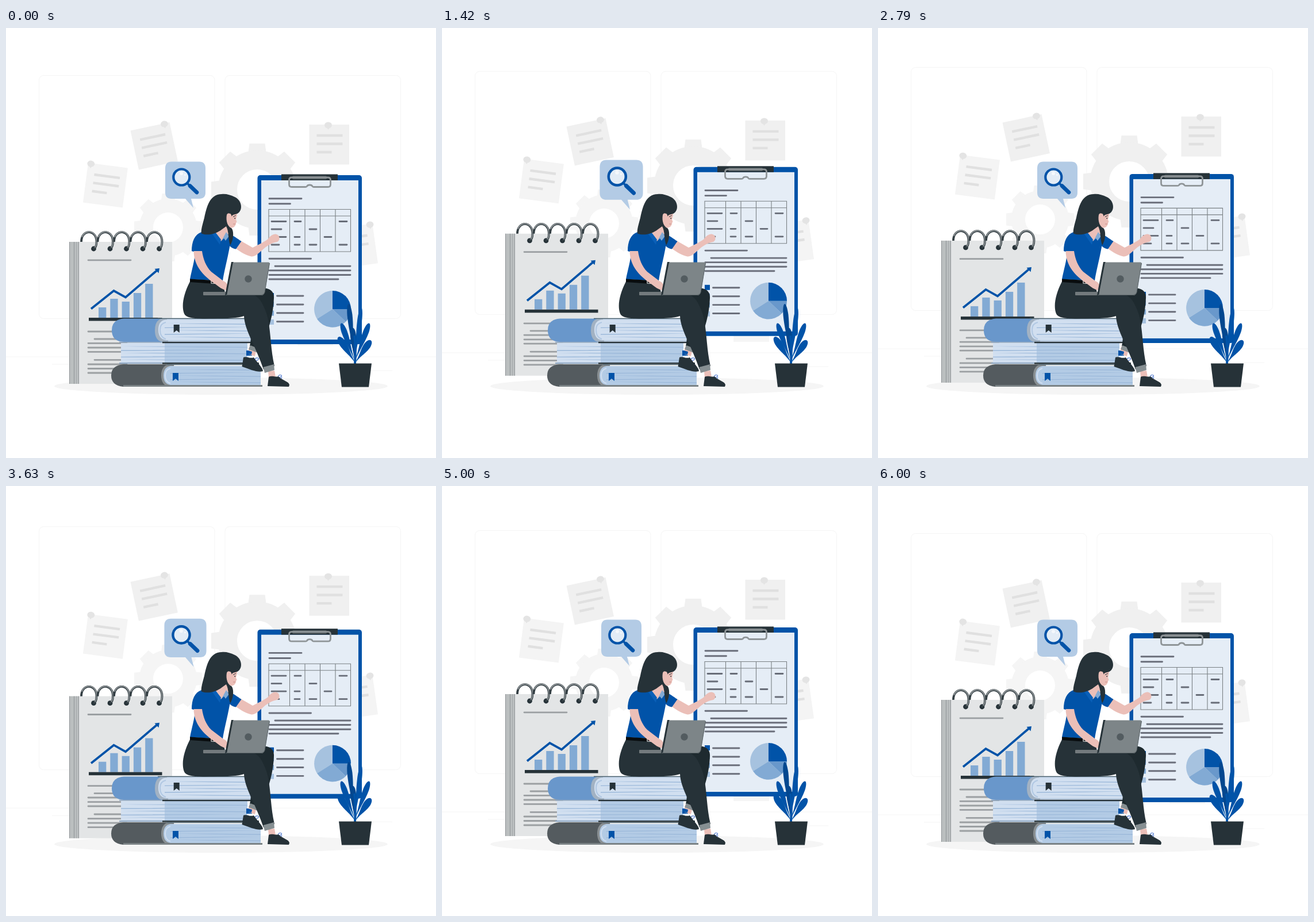
An HTML page that plays this animation: 748 px wide and 748 px high, repeating every 6.04 s.

```html
<!DOCTYPE html>
<html lang="en">
<head>
<meta charset="utf-8">
<title>Report analysis</title>
<style>
html, body { margin: 0; width: 100%; height: 100%; overflow: hidden; background: #fff; }
svg { display: block; width: 100%; height: 100%; }
</style>
</head>
<body>
<svg id="stage" viewBox="0 0 748 748"></svg>
<script>
const BLUE = '#0153a8', DARK = '#263238', SKIN = '#ebbfb8', PALE = '#b3cbe5', LIGHT = '#d1dff0';

const path = (d, fill, more = '') => `<path d="${d}" fill="${fill}" ${more}/>`;
const stroke = (d, color, width, more = '') =>
  `<path d="${d}" fill="none" stroke="${color}" stroke-width="${width}" ${more}/>`;
const rect = (x, y, w, h, fill, r = 0, more = '') =>
  `<rect x="${x}" y="${y}" width="${w}" height="${h}" rx="${r}" fill="${fill}" ${more}/>`;
const circle = (x, y, r, fill, more = '') => `<circle cx="${x}" cy="${y}" r="${r}" fill="${fill}" ${more}/>`;
const group = (id, body) => `<g id="${id}">${body}</g>`;
// rows of [y, from, to, from, to, ...] drawn as horizontal rules
const rules = (rows, color, width, cap = 'round') => stroke(rows.map(([y, ...xs]) =>
  xs.map((x, i) => (i % 2 ? 'H' + x : `M${x},${y}`)).join('')).join(''), color, width, `stroke-linecap="${cap}"`);

function gear(x, y, body, hole, tip, tooth, color) {
  let teeth = '';
  for (let a = 0; a < 360; a += 45)
    teeth += path(`M${-tooth * 0.58},${-body + 4}L${-tooth / 2},${-tip}H${tooth / 2}L${tooth * 0.58},${-body + 4}Z`,
      color, `transform="rotate(${a})"`);
  const ring = circle(0, 0, (body + hole) / 2, 'none', `stroke="${color}" stroke-width="${body - hole}"`);
  return `<g transform="translate(${x} ${y})">${teeth}${ring}</g>`;
}

function note(x, y, angle, pin, color) {
  return `<g transform="translate(${x} ${y}) rotate(${angle})">` + rect(0, 0, 69.5, 69.5, color) +
    rules([[19, 13, 58], [33.5, 13, 58], [48, 13, 39]], '#e0e0e0', 4.4, 'butt') +
    path(`M${pin - 3},4L${pin},9L${pin + 3},4Z`, '#e4e4e4') +
    `<ellipse cx="${pin}" cy="1" rx="6.5" ry="5.5" fill="#e4e4e4"/></g>`;
}

function background() {
  const frame = x => rect(x, 82.5, 305.5, 423, 'none', 8, 'stroke="#f5f5f5"');
  return frame(57.5) + frame(381) +
    stroke('M0,572H748M80,585H160M395,600H430M600,596H672', '#f5f5f5', 1) +
    rect(507, 520, 62, 33, '#f5f5f5') +
    gear(282, 347, 50, 26, 59, 21, '#f5f5f5') + gear(437, 281, 68, 35, 80, 27, '#f0f0f0') +
    note(216.5, 178.5, -12, 60, '#f0f0f0') + note(143, 234.5, 7.5, 5, '#f4f4f4') +
    note(527.5, 168, 0, 33, '#f0f0f0') + note(568.5, 350, -8, 65, '#f4f4f4');
}

function notepad() {
  let s = rect(110, 372, 179, 247, '#e3e5e6') + rect(110, 372, 17, 247, '#babebf') +
    stroke('M110.5,372V619M118.5,372V619M126.5,372V619', '#909597', 1) +
    stroke('M122.5,372V619', '#a5aaac', 1);
  for (let i = 0; i < 5; i++) {
    const x = 131 + i * 28.5;
    s += circle(x + 21.5, 384, 4.4, DARK) +
      stroke(`M${x},372C${x},349.5 ${x + 26.5},349.5 ${x + 26.5},372C${x + 26.5},379 ${x + 24},383 ${x + 21},384`, '#333e43', 3.8) +
      stroke(`M${x + 1},364C${x + 5},351 ${x + 26.5},349.5 ${x + 26.5},372C${x + 26.5},377 ${x + 25},380 ${x + 23.5},382`, '#8b9194', 1.9);
  }
  [18, 33, 28, 43, 59].forEach((h, i) => s += rect(161 + i * 20.3, 504 - h, 13.3, h, '#82aad4'));
  return s + rect(144, 504, 127.5, 5.5, DARK) +
    stroke('M148,488.5L187.5,457L208,468.5L264,420.5', BLUE, 3.8) + path('M258.5,419L267,418L265.5,426.5Z', BLUE) +
    rules([[403.8, 143, 217], [528, 143, 190], [541, 154, 210], [548.3, 143, 210], [556, 143, 210], [563.3, 143, 210],
      [577.3, 154, 210], [585, 143, 210], [592.5, 143, 210], [600, 143, 210]], '#9b9fa2', 2.8);
}

function clipboard() {
  return rect(437.5, 256, 181.5, 294, BLUE, 5) + rect(444, 265, 169, 277, '#e5edf6') +
    rect(479, 254.5, 98, 10.5, DARK) + rect(498, 257.3, 60, 6, '#566064', 2) +
    stroke('M497,260Q492.5,260 492.5,264.5V272Q492.5,276.5 497,276.5H521Q523,276.5 523.5,275.5A5,3.6 0 0 1 533,275.5Q533.5,276.5 535,276.5H560Q564.5,276.5 564.5,272V264.5Q564.5,260 560,260Z', '#8f9598', 2.8) +
    rules([[296.7, 458, 514], [305.8, 458, 494.5], [401.3, 458, 530.5], [414.3, 468, 599], [421.8, 458, 599],
      [429.5, 458, 599], [437, 458, 578], [466, 471.5, 517], [481, 471.5, 517], [495.8, 471.5, 517], [510.7, 471.5, 517]], '#6b6f7b', 2.9) +
    stroke('M457,315.5H599.5V389H457ZM457,327H599.5M493.5,315.5V389M520,315.5V389M546.5,315.5V389M573,315.5V389', '#7a8084', 1.1) +
    rules([[336.5, 462, 487, 502, 513, 580, 593], [350, 462, 479, 528, 540], [363.5, 462, 487, 502, 511, 554, 566],
      [377, 462, 475, 502, 511, 528, 540, 580, 593]], '#686d78', 2.8) +
    rect(457, 461, 9, 9, BLUE) + rect(457, 476, 9, 9, '#6997cb') + rect(457, 491.5, 9, 9, '#82aad4') + rect(457, 507, 9, 9, '#a6c2e0') +
    path('M568,489V457A32,32 0 0 0 541,506Z', '#a6c2df') + path('M568,489L541,506A32,32 0 0 0 591,511Z', '#82aad4') +
    path('M568,489L591,511A32,32 0 0 0 600,489Z', '#6998cb') + path('M568,489H600A32,32 0 0 0 568,457Z', BLUE);
}

function bubble() {
  return path('M288,232.5H336Q347,232.5 347,244V286Q347,297 336,297H322L326,313L312,297H288Q277,297 277,286V244Q277,232.5 288,232.5Z', PALE) +
    circle(305.3, 259.5, 14, '#e3ecf6', `stroke="${BLUE}" stroke-width="4.2"`) +
    circle(305, 253, 3, '#f5f8fc') + circle(311.5, 255.5, 1.5, '#f5f8fc') +
    stroke('M315,269.5L320,275', BLUE, 3.6) + stroke('M320,274.5L332,286', BLUE, 6.6, 'stroke-linecap="round"');
}

// thin wedges running inwards from either edge of the block
function pages(x, y, h, right) {
  let d = '';
  for (let i = 1; i < 6; i++) {
    const ly = y + i * h / 6, tip = i % 2 ? x : right, end = x + right - tip;
    d += `M${tip},${ly}Q${(x + right) / 2},${ly + 2} ${end},${ly + 2.4}L${end},${ly + 1}Q${(x + right) / 2},${ly} ${tip},${ly}Z`;
  }
  return path(d, '#9cb9da');
}

function books() {
  const mark = (x, y, fill) => path(`M${x},${y}h10v14l-5,-4l-5,4Z`, fill);
  return rect(264, 504.7, 176, 41, '#b9cce1') +
    path('M205,505.5H272V546H205Q184,545 184,526Q184,507 205,505.5Z', '#6997cb') +
    path('M280,505.5H271Q259,508 259,526Q259,543 271,546H282Z', '#a2b2c3') +
    path('M440,507.5H278Q265,509 265,525Q265,541 278,543H440Z', LIGHT) + pages(276, 508, 35, 440) +
    stroke('M278,512Q268,514 268,525Q268,538 278,541', '#b1c8e3', 2) +
    rules([[505.3, 264, 420]], '#455a64', 1.2, 'butt') + mark(291.7, 516, DARK) +
    rect(200, 548, 76, 34, LIGHT) + rect(276, 548, 144, 34, PALE) + pages(200, 548, 34, 420) +
    rules([[546.7, 197, 272], [583, 197, 272]], '#8ba5c2', 1.8, 'butt') +
    rules([[547, 272, 440], [583.3, 272, 440]], DARK, 2.5, 'butt') + rect(418, 561, 10, 9, BLUE) +
    path('M204,585H290V624H204Q183,622 183,604.5Q183,587 204,585Z', '#545b5f') +
    path('M292,585H283Q270,588 270,604.5Q270,621 283,624H294Z', '#898f92') +
    path('M443,588H286Q274,590 274,604.5Q274,619 286,621H443Z', PALE) + pages(286, 588, 33, 443) +
    stroke('M286,592Q277,594 277,604.5Q277,616 286,618', LIGHT, 2) +
    rules([[585.5, 280, 425]], '#455a64', 1.5, 'butt') + rules([[622.5, 204, 446]], '#7b8386', 3, 'butt') + mark(290, 600, BLUE);
}

function woman() {
  return path('M423,554L436,558L433,571L421,567Z', SKIN) + path('M456,597L467,596L469,607L457,608Z', SKIN) +
    path('M421,561l7,2l-1,5l-7,-1Z', BLUE) + stroke('M433,580q-1,-7 5,-6q4,2 -3,5', '#4d77cf', 1.2) +
    stroke('M473,608q1,-6 6,-4q2,3 -4,4q3,4 5,0', '#4d77cf', 1.2) +
    path('M413,573C418,570 424,576 431,573C436,581 447,591 447,597C438,600 425,594 410.5,589Z', DARK) +
    path('M457,607C463,604 470,608 474,606C480,613 493,615 493,621L492,624L455,623Z', DARK) +
    path('M436,453C456,450 467,456 466,470C465,502 455,532 440,560L424,553C430,530 420,500 428,464Z', '#1e2a2f') +
    path('M425,552L441,558L438,565L422,559Z', '#868f92') +
    path('M320,441C308,464 305,485 310,497C314,506 335,506 360,505.5C385,505 404,505 414,501C415,526 434,552 448,594L467,588C458,550 462,510 448,484C443,472 436,465 425,462L382,464L377,444Z', DARK) +
    path('M447.5,590L466,585L467,595L450,600Z', '#868f92') +
    // arms, torso and head
    path('M408,370L429,382C437,378 448,373 456,367C460,360 468,356 473,360C477,364 476,370 472,372C463,373 452,380 445,387C437,394 432,398 427,397.5C417,395 408,390 399,383Z', SKIN) +
    path('M362,352L384,338L387,362L375,373Z', SKIN) +
    path('M387,358C395,360 403,367 409.5,371L400,384.5C394,384 390,380 386,377Z', BLUE) +
    path('M340,355C328,359 323,372 323,388L329,390C328,406 323,421 320,437L377,440C379,425 385,403 389,381L390,361L384,358L374,371L362,356Z', BLUE) +
    path('M358,357L364,355L374,368L372,377Z', '#0a60b8') + path('M375,370L383,355L388,362L382,370L379,366Z', '#82aad4') +
    path('M320,436.5L378,440V446L320,442Z', '#080c0e') + stroke('M357,439L371,440V445L357,444Z', '#fff', 1.1) +
    path('M326.5,388L341,388C343,402 348,415 357,424L378,440C386,444 389,450 382,456C374,454 368,448 362,444C344,431 327,415 326.5,388Z', SKIN) +
    path('M383,325C382,335 382,345 390,347.5C396,348 399,345 400,340L401.5,336L400,334L402,325C401,318 392,315 383,325Z', SKIN) +
    path('M375,289C354,289 349,312 345,330C341,345 339,352 340,357.5C350,361.5 365,359 376,350L383,345C388,354 386,366 390,378C396,369 397,353 392,348C386,346 382,336 384,325C386,320 391,322 392,328C396,322 401,326 406,320C412,313 409,299 398,294C390,290 382,288 375,289Z', DARK) +
    stroke('M386,327q4,-6 5,1q-1,5 -4,6', SKIN, 3) +
    stroke('M395,328.5L400,326', DARK, 1) + circle(398.2, 331, 0.9, DARK) + stroke('M395,341h4', '#c98f8a', 1) +
    // laptop
    rect(343, 459, 43, 6, '#737a7d', 1) + path('M392,407H396L385,465H381Z', DARK) +
    path('M395,407.5H457Q459,408 458.5,410L450,460Q449,465 444,465H384Z', '#7d8588') +
    stroke('M382,464.5H444Q449,464 450,460L458.5,409', '#586165', 1) + circle(421.5, 436.5, 6.2, '#535c60');
}

function plant() {
  const leaf = ([x, y, bx, by, w, fill = BLUE]) => {
    const dx = x - bx, dy = y - by, n = Math.hypot(dx, dy), px = -dy / n * w, py = dx / n * w;
    const at = (k, s) => `${bx + dx * k + px * s},${by + dy * k + py * s}`;
    return path(`M${bx},${by}C${at(.4, .25)} ${at(.5, 1)} ${at(.78, 1)}C${at(1.06, .8)} ${at(1.06, -.8)} ${at(.78, -1)}C${at(.5, -1)} ${at(.4, -.25)} ${bx},${by}Z`, fill);
  };
  const DEEP = '#03478f';
  return [[596, 479, 605, 570, 4.5, DEEP], [618, 485, 606, 583, 4], [583, 513, 607, 580, 5], [632, 513, 607, 580, 5],
    [603, 521, 607, 582, 5, DEEP], [578, 537, 608, 583, 6], [635, 543, 607, 583, 6]].map(leaf).join('') +
    stroke('M607,584Q609,560 606,535', BLUE, 4) + path('M579,583.5H636L631,624.5H584Z', DARK);
}

const stage = document.getElementById('stage');
stage.innerHTML = group('back', background()) +
  '<ellipse cx="374" cy="623" rx="290" ry="15" fill="#f5f5f5"/>' +
  group('pad', notepad()) + group('board', clipboard()) + group('bubble', bubble()) +
  books() + woman() + plant();

const [back, pad, board, balloon] = ['back', 'pad', 'board', 'bubble'].map(id => document.getElementById(id));
const float = (t, period) => -15 * (1 - Math.abs(1 - 2 * (t % period) / period));
const BEAT = [[0, 1], [300, 1.1], [900, 1], [1200, 1], [1500, 1.1], [1800, 1], [3000, 1]];

function beat(t) {
  const i = BEAT.findIndex(([end]) => t < end), [t0, a] = BEAT[i - 1], [t1, b] = BEAT[i];
  return a + (b - a) * (t - t0) / (t1 - t0);
}

function draw(now) {
  const t = Math.min(now % 6040, 6000);
  const shift = (el, y) => el.setAttribute('transform', `translate(0 ${y})`);
  shift(back, float(t, 6000));
  shift(pad, float(t, 3000));
  shift(board, float(t, 3000));
  balloon.setAttribute('transform', `translate(312 272.8) scale(${beat(t % 3000)}) translate(-312 -272.8)`);
}

const start = performance.now();
function tick() {
  draw(performance.now() - start);
  requestAnimationFrame(tick);
}
tick();
</script>
</body>
</html>
```
